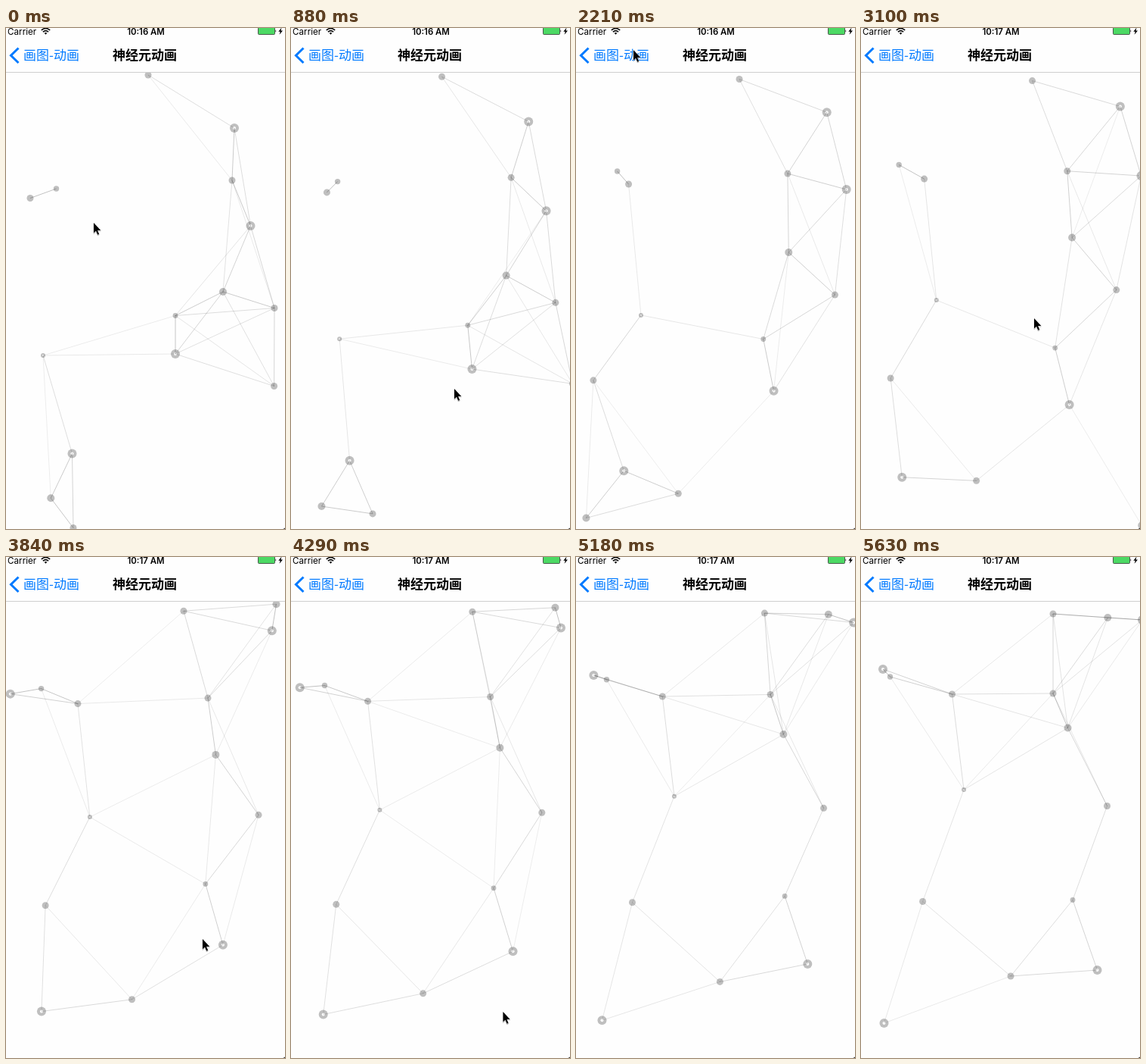
These frames come from a looping animation (369x661 px, 5.68 s). An HTML page with a canvas:

```html
<!DOCTYPE html>
<html lang="zh-CN">
<head>
<meta charset="utf-8">
<title>神经元动画</title>
<style>
  html, body { margin: 0; width: 100%; height: 100%; overflow: hidden; background: #fefefe; }
  canvas, svg { position: absolute; left: 0; top: 0; }
  .status { font: 11.7px Inter, "Liberation Sans", sans-serif; }
  .nav { font: 17px "Noto Sans CJK SC", "Noto Sans CJK", sans-serif; }
</style>
</head>
<body>
<canvas id="net" width="369" height="661"></canvas>
<svg width="369" height="661" viewBox="0 0 369 661">
  <rect width="369" height="58" fill="#fefefe"/>
  <rect y="58" width="369" height="1" fill="#cfcfcf"/>
  <g class="status">
    <text x="2" y="8.5">Carrier</text>
    <text id="clock" x="185" y="8.5" font-size="11.4" font-weight="600" text-anchor="middle"></text>
  </g>
  <g fill="none" stroke="#000" stroke-width="1.6">
    <path d="M46.8 2.9Q52.5 -2 58.2 2.9M48.9 5.2Q52.5 2.2 56.1 5.2"/>
    <path d="M50.6 6.6Q52.5 5.2 54.4 6.6L52.5 8.8Z" fill="#000" stroke="none"/>
  </g>
  <rect x="333.5" y="-.5" width="22" height="9" rx="1" fill="#4cd964" stroke="#333" stroke-width=".8"/>
  <path d="M356.5 2.5q1.6 1.5 0 3zM364.5 -.5L360.3 4.8H362.7L361.6 8.8 366 3.4H363.5Z"/>
  <path d="M16.5 26.5L6.5 36.2 16.5 46" fill="none" stroke="#007aff" stroke-width="3"/>
  <g class="nav">
    <text x="23" y="42" fill="#007aff">画图-动画</text>
    <text x="183.5" y="42" font-weight="700" text-anchor="middle">神经元动画</text>
  </g>
  <path d="M369 659.5V661H366.5Z" fill="#333"/>
  <path id="cursor" d="M0 0V13.5L3 10.8 5.2 15.8 7.2 14.9 5.1 10H9.3Z" stroke="#fff" stroke-width="1"
        paint-order="stroke" style="filter:drop-shadow(0 1px .7px #0004)"/>
</svg>
<script>
const LOOP = 5680, TICK = 148, LAST = 38, REACH = 189;
const ctx = document.getElementById('net').getContext('2d');
const clock = document.getElementById('clock');
const cursor = document.getElementById('cursor');

// Start, travel over one loop, radius; multiples of 3 are hollow
const cells = [
  [188, 62, 66, 13, 4.5],
  [302, 132, 70, -49, 6],
  [299, 201, -45, -21, 4.5],
  [323.5, 261, 80.5, -113, 6],
  [287, 348, -13.5, -122.5, 5],
  [355, 369.5, -29.5, -41, 4.5],
  [224, 379.5, 56, 73, 3.4],
  [49, 432, 87, -125, 3],
  [224, 430, 88.5, 115, 6],
  [354.6, 472.5, 102, -18, 4.5],
  [87.5, 561.5, -57, 53.5, 6],
  [59.3, 620.3, -108, 61.7, 5],
  [89, 659.5, 109, -106.5, 4.5],
  [66.5, 212, -28, -54, 3.7],
  [32, 224.5, 88.5, -43.5, 4.5]
];

// Pointer stops: tick, x, y
const stops = [[0, 116, 257], [6, 216, 476], [15, 76, 29], [21, 229, 383], [26, 260, 504], [31, 294, 664]];

const wrap = (v, min, size) => min + ((v - min) % size + size) % size;

function pointer(n) {
  const i = stops.findIndex(k => k[0] > n);
  if (i < 0) return stops.at(-1).slice(1);
  const [t0, x0, y0] = stops[i - 1], [t1, x1, y1] = stops[i];
  const u = (n - t0) / (t1 - t0);
  return [x0 + (x1 - x0) * u, y0 + (y1 - y0) * u];
}

function disc(x, y, r, color) {
  ctx.fillStyle = color;
  ctx.beginPath();
  ctx.arc(x, y, r, 0, 2 * Math.PI);
  ctx.fill();
}

function link(a, b) {
  const d = Math.hypot(a.x - b.x, a.y - b.y);
  if (d > REACH) return;
  ctx.strokeStyle = `rgba(0,0,0,${.14 + .42 * (1 - d / REACH)})`;
  ctx.beginPath();
  ctx.moveTo(a.x, a.y);
  ctx.lineTo(b.x, b.y);
  ctx.stroke();
}

function draw(n) {
  const u = n / LAST;
  const s = u + .125 * u * (1 - u); // the drift slows slightly
  const dots = cells.map(([x, y, dx, dy, r]) =>
    ({ x: wrap(x + dx * s, 0, 375), y: wrap(y + dy * s, 59, 602), r }));

  ctx.clearRect(0, 0, 369, 661);
  ctx.lineWidth = .5;
  for (const { x, y, r } of dots) {
    disc(x, y, r, '#bfbfbf');
    if (r % 3 === 0) disc(x, y, r / 3, '#fefefe');
  }
  dots.forEach((a, i) => dots.slice(i + 1).forEach(b => link(a, b)));

  clock.textContent = n < 16 ? '10:16 AM' : '10:17 AM';
  cursor.setAttribute('transform', `translate(${pointer(n)})`);
}

const start = performance.now();
function frame() {
  const t = (performance.now() - start) % LOOP;
  draw(Math.floor((t + 14) / TICK));
  requestAnimationFrame(frame);
}
frame();
</script>
</body>
</html>
```
